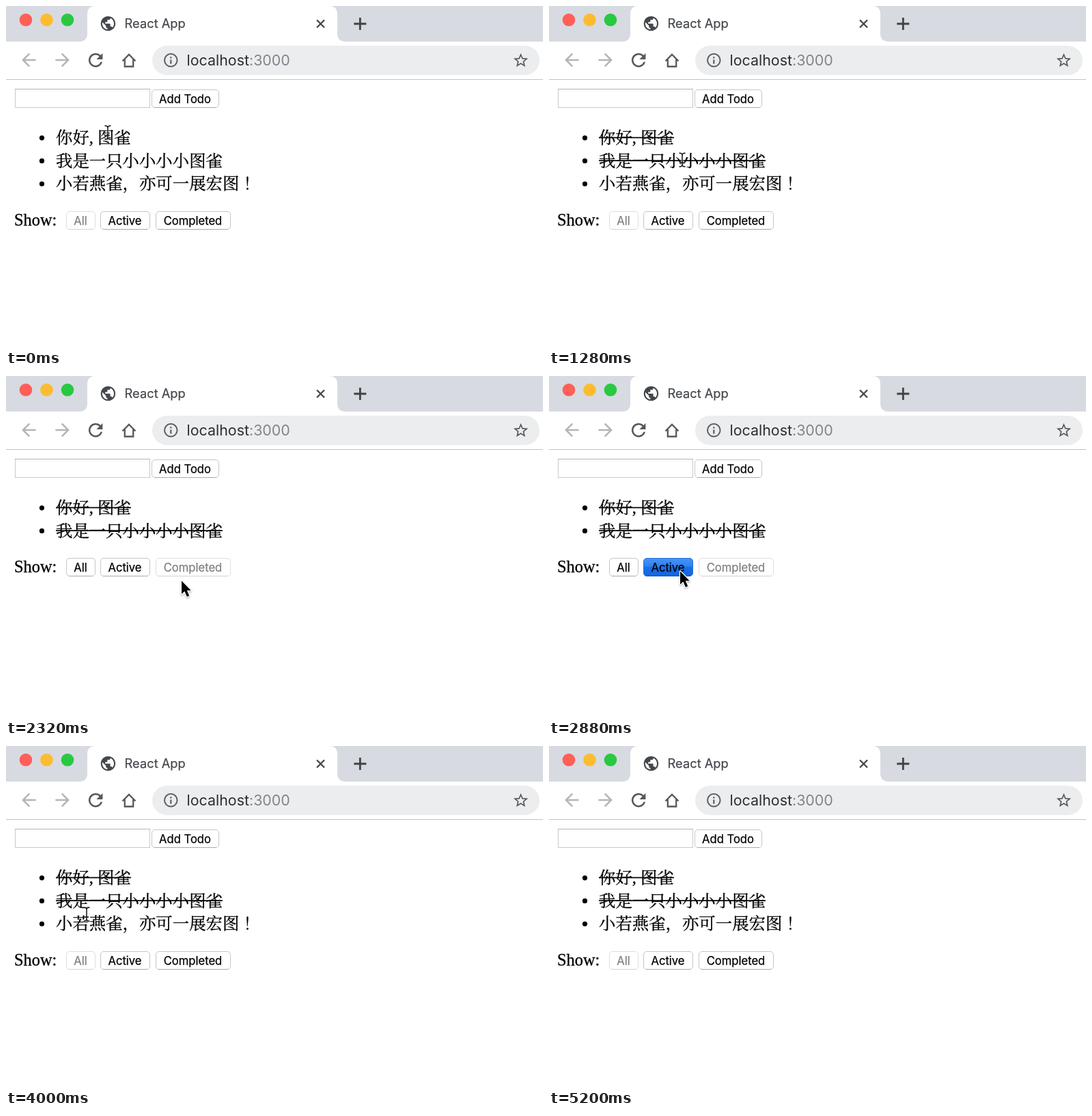
An HTML page for the animation above (5.7 s loop, 786 px wide and 500 px high).

```html
<!DOCTYPE html>
<html lang="zh-CN">
<head>
<meta charset="utf-8">
<title>Todo list</title>
<style>
  html, body { margin: 0; width: 100%; height: 100%; overflow: hidden; background: #fff; }
  svg { display: block; }
  .ui { font-family: Inter, Roboto, sans-serif; }
  .btn { font-size: 16.6px; }
  .btn text { stroke: currentColor; stroke-width: .25px; }
  .btn rect { fill: #fff; stroke: #c6c6c6; }
  .btn .edge { fill: none; stroke: #a9a9a9; }
  .btn.off { fill: #808080; color: #808080; }
  .btn.off rect { stroke: #dedede; }
  .btn.off .edge { stroke: #d2d2d2; }
  .btn.down rect { fill: url(#blue); stroke: #2470dc; }
  .btn.down .edge { stroke: #1059c8; }
  .page { font: 24.4px "Liberation Serif", "Noto Serif CJK SC", "Noto Sans CJK SC", serif; }
  .page text, text.page { stroke: #000; stroke-width: .3px; }
  .item { font-weight: 500; }
  .wide { font-family: "Noto Serif CJK JP", "Noto Sans CJK JP", serif; }
</style>
</head>
<body>
<svg width="786" height="500" viewBox="0 0 786 500">
  <defs>
    <linearGradient id="blue" x2="0" y2="1">
      <stop offset="0" stop-color="#4793f8"/>
      <stop offset=".45" stop-color="#2f80f2"/>
      <stop offset=".5" stop-color="#1a6fe9"/>
      <stop offset="1" stop-color="#1465de"/>
    </linearGradient>
    <filter id="soft" x="-50%" y="-50%" width="200%" height="200%">
      <feDropShadow dx="0" dy="1.5" stdDeviation="1.3" flood-opacity=".35"/>
    </filter>
    <path id="back" d="M20 11H7.83l5.59-5.59L12 4l-8 8 8 8 1.41-1.41L7.83 13H20z"/>
    <path id="bar" d="M-4.5-10Q0-10 0-7V7Q0 10-4.5 10M4.5-10Q0-10 0-7M0 7Q0 10 4.5 10M-3 4H3"/>
  </defs>

  <rect width="786" height="500" fill="#fff"/>
  <g class="ui">
    <rect width="786" height="52" fill="#d8dae1"/>
    <circle cx="29" cy="20.3" r="9.3" fill="#ff5f57"/>
    <circle cx="59.5" cy="20.3" r="9.3" fill="#fdbc2f"/>
    <circle cx="90" cy="20.3" r="9.3" fill="#28c941"/>
    <path d="M107 52q12 0 12-12V12q0-12 12-12H473q12 0 12 12V40q0 12 12 12z" fill="#fff"/>
    <path transform="translate(136.6 12.8) scale(1.07)" fill="#44484d" d="M12 2a10 10 0 1 0 0 20 10 10 0 0 0 0-20zm-1 17.93c-3.95-.49-7-3.85-7-7.93 0-.62.08-1.21.21-1.79L9 15v1c0 1.1.9 2 2 2zm6.9-2.54c-.26-.81-1-1.39-1.9-1.39h-1v-3c0-.55-.45-1-1-1H8v-2h2c.55 0 1-.45 1-1V7h2c1.1 0 2-.9 2-2v-.41c2.93 1.19 5 4.06 5 7.41 0 2.08-.8 3.97-2.1 5.39z"/>
    <text x="173.6" y="32" font-size="18.3" fill="#44484d" stroke="#44484d" stroke-width=".25">React App</text>
    <path d="M455 20.5l11 11m0-11l-11 11" stroke="#44484d" stroke-width="2.3"/>
    <path d="M509.3 26h18m-9-9v18" stroke="#3f4348" stroke-width="2.8"/>

    <use href="#back" transform="translate(18 63.6) scale(1.28)" fill="#b3b5b8"/>
    <use href="#back" transform="translate(98 63.6) scale(-1.28 1.28)" fill="#b3b5b8"/>
    <path transform="translate(115.8 63.8) scale(1.28)" fill="#55595e" d="M17.65 6.35A8 8 0 1 0 19.73 14h-2.08A6 6 0 1 1 16.22 7.78L13 11h7V4z"/>
    <path d="M170.5 80.5l9.5-9.5 9.5 9.5M173.8 78v10.5h12.4V78" fill="none" stroke="#55595e" stroke-width="2.3"/>
    <rect x="214" y="58" width="567" height="43" rx="21.5" fill="#ecedee"/>
    <circle cx="241.3" cy="79.3" r="9.3" fill="none" stroke="#5b5f64" stroke-width="2"/>
    <path d="M241.3 78.5v6m0-10.3v2.3" stroke="#5b5f64" stroke-width="2.2"/>
    <text x="264.6" y="87" font-size="21.4" fill="#2b2e32">localhost<tspan fill="#80868b">:3000</tspan></text>
    <path transform="translate(740.8 66.8) scale(1.06)" fill="#55595e" d="M22 9.24l-7.19-.62L12 2 9.19 8.63 2 9.24l5.46 4.73L5.82 21 12 17.27 18.18 21l-1.63-7.03zM12 15.4l-3.76 2.27 1-4.28-3.32-2.88 4.38-.38L12 6.1l1.71 4.04 4.38.38-3.32 2.88 1 4.28z"/>
    <path d="M0 107.5h786" stroke="#c3c3c3"/>
  </g>

  <g id="form">
    <rect x="13.5" y="121.5" width="197" height="27" fill="#fff" stroke="#c9c9c9"/>
    <path d="M13 121.5h198" stroke="#b4b4b4"/>
  </g>
  <g id="list" class="page"></g>
  <g id="filters">
    <text class="page" x="12" y="320.5">Show:</text>
  </g>
  <g id="cursor">
    <path id="arrow" transform="translate(0 1.5) scale(.88)" filter="url(#soft)" d="M0 0V22L5 17.4 9 26.5 12.8 24.8 8.9 15.9H15.6z" stroke="#fff" stroke-width="2.6" paint-order="stroke" stroke-linejoin="round"/>
    <g id="beam" fill="none">
      <use href="#bar" stroke="#fff" stroke-opacity=".7" stroke-width="3.2"/>
      <use href="#bar" stroke="#111" stroke-width="1.5"/>
    </g>
  </g>
</svg>
<script>
const LOOP = 5700, STEP = 80, ROW = 33.6;
const $ = id => document.getElementById(id);

function add(parent, html) {
  const g = document.createElementNS('http://www.w3.org/2000/svg', 'g');
  g.innerHTML = html;
  return parent.appendChild(g);
}

function button(parent, label, x, y, w, h) {
  const g = add(parent,
    `<rect x="${x + .5}" y="${y + .5}" width="${w - 1}" height="${h - 1}" rx="4.5"/>` +
    `<path class="edge" d="M${x + 4} ${y + h - .5}h${w - 8}"/>` +
    `<text x="${x + w / 2 - .5}" y="${y + 19.8}" text-anchor="middle">${label}</text>`);
  g.setAttribute('class', 'ui btn');
  return g;
}

// text, strike width, time it gets struck
const items = [
  ['你好, 图雀', 110, 560],
  ['我是一只小小小小图雀', 244, 1120],
  ['小若燕雀\uff0c亦可一展宏图<tspan class="wide" lang="ja">\uff01</tspan>', 0, Infinity]
].map(([text, width, doneAt]) => {
  const node = add($('list'),
    `<circle cx="52.5" cy="192.8" r="3.6"/><text class="item" x="73" y="201">${text}</text>` +
    `<rect x="73" y="191.6" width="${width}" height="1.7"/>`);
  return { node, doneAt, line: node.lastChild };
});

button($('form'), 'Add Todo', 213, 122, 99, 27);
const buttons = {
  all: button($('filters'), 'All', 88, 300, 43, 27),
  active: button($('filters'), 'Active', 138, 300, 73, 27),
  completed: button($('filters'), 'Completed', 219, 300, 110, 27)
};

// time, filter, pressed button
const states = [
  [0, 'all', ''], [1840, 'all', 'completed'],
  [2000, 'completed', ''], [2800, 'completed', 'active'],
  [2960, 'active', ''], [3760, 'active', 'all'],
  [3920, 'all', '']
];

// time, x, y of the pointer
const path = [
  [0, 149, 185], [640, 149, 188], [1040, 195, 225], [1280, 195, 225],
  [1760, 284, 307], [2080, 284, 307], [2560, 230, 289], [2800, 192, 284],
  [3200, 192, 283], [3600, 127, 255], [3760, 115, 249], [3920, 115, 248],
  [4000, 118, 246], [4480, 150, 285], [5040, 190, 512], [LOOP, 190, 512]
];

function pointer(t) {
  const i = path.findIndex(p => p[0] > t);
  const [t0, x0, y0] = path[i - 1], [t1, x1, y1] = path[i];
  const k = (t - t0) / (t1 - t0), e = k * k * (3 - 2 * k);
  return [x0 + (x1 - x0) * e, y0 + (y1 - y0) * e];
}

const show = (node, on) => node.setAttribute('visibility', on ? 'inherit' : 'hidden');

function draw(now) {
  const t = Math.floor(now % LOOP / STEP) * STEP;
  const [, filter, pressed] = states.filter(s => s[0] <= t).pop();

  let rows = 0;
  for (const { node, line, doneAt } of items) {
    const done = t >= doneAt;
    const seen = filter === 'all' || done === (filter === 'completed');
    show(node, seen);
    show(line, done);
    if (seen) node.setAttribute('transform', `translate(0 ${ROW * rows++})`);
  }

  $('filters').setAttribute('transform', `translate(0 ${Math.round((rows - 3) * ROW)})`);
  for (const name in buttons) {
    const look = name === pressed ? ' down' : name === filter ? ' off' : '';
    buttons[name].setAttribute('class', 'ui btn' + look);
  }

  const [x, y] = pointer(t);
  const onText = x > 73 && x < 366 && y > 175 && y < 175 + ROW * rows;
  $('cursor').setAttribute('transform', `translate(${x} ${y})`);
  show($('cursor'), t < 5200);
  show($('arrow'), !onText);
  show($('beam'), onText);
}

const start = performance.now();
function tick() {
  draw(performance.now() - start);
  requestAnimationFrame(tick);
}
tick();
</script>
</body>
</html>
```
